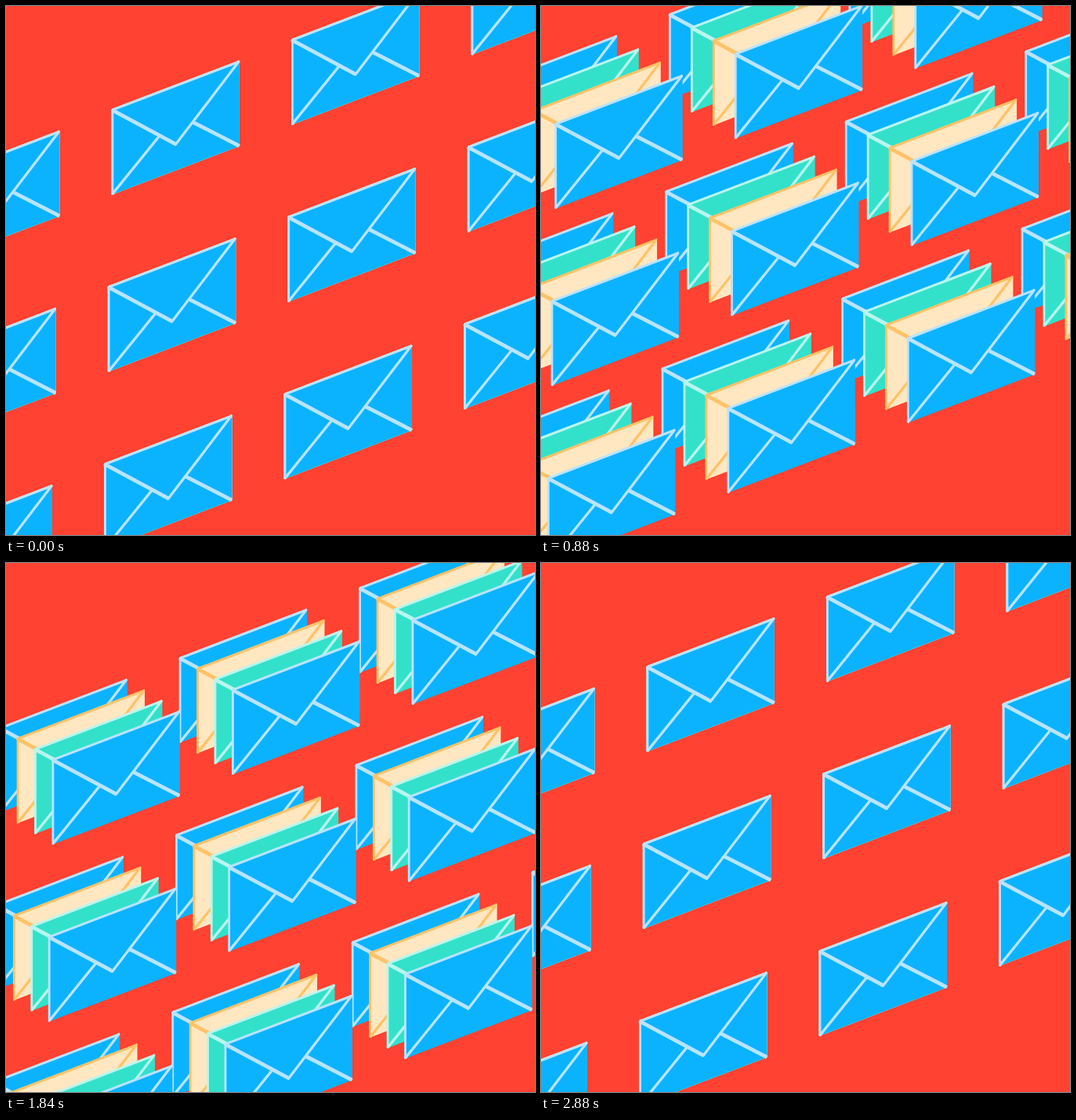
These frames come from a looping animation (675 by 675 pixels, 2.92 s). An HTML page:

```html
<!DOCTYPE html>
<html lang="en">
<head>
<meta charset="utf-8">
<title>Envelopes</title>
<style>
  html, body { margin: 0; width: 100%; height: 100%; overflow: hidden; background: #ff4231; }
  svg { display: block; width: 100%; height: 100%; }
  .edge, .fold { fill: none; stroke-linecap: round; stroke-linejoin: round; }
  .edge { stroke-width: 3.3; }
  .fold { stroke-width: 4.3; }
</style>
</head>
<body>
<svg id="stage" viewBox="0 0 675 675"></svg>
<script>
const NS = 'http://www.w3.org/2000/svg';
const stage = document.getElementById('stage');

const FRAME = 40, FRAMES = 73, TURN = 1440;
const ROWS = 3;
const ORIGIN = { x: 135.7, y: 132.8 };
const ACROSS = { x: 229.5, y: -89.3 };
const DOWN = { x: -4.7, y: 226 };
const SPREAD = { x: 30, y: 18.05 };

const BLUE = { fill: '#0bb3ff', line: '#b9e4fd' };
const CREAM = { fill: '#ffe7c1', line: '#ffc267' };
const GREEN = { fill: '#33e1ca', line: '#b9f6ee' };
const STACK = [BLUE, CREAM, GREEN, BLUE];

function add(parent, tag, attributes) {
  const node = document.createElementNS(NS, tag);
  for (const name in attributes) node.setAttribute(name, attributes[name]);
  return parent.appendChild(node);
}

// A flat envelope, drawn upright and slanted by the matrix.
function addEnvelope(parent, x, y, { fill, line }) {
  const g = add(parent, 'g', { transform: `matrix(.85 -.324 0 1 ${x} ${y})` });
  add(g, 'path', { d: 'M0 0H190.8V107.7H0Z', fill });
  add(g, 'path', { class: 'edge', stroke: line, d: 'M.3 106.5V0H189' });
  add(g, 'path', {
    class: 'fold',
    stroke: line,
    d: 'M1.3 106.3L71 55.6M189 106.3L121.2 54.8M.5 .5L95.3 74.4L189 .3'
  });
}

function addLayer(colors) {
  const layer = add(stage, 'g', {});
  for (let row = 0; row < ROWS; row++) {
    for (let col = -4; col <= 4; col++) {
      const x = ORIGIN.x + col * ACROSS.x + row * DOWN.x;
      const y = ORIGIN.y + col * ACROSS.y + row * DOWN.y;
      addEnvelope(layer, x, y, colors);
    }
  }
  return layer;
}

const layers = STACK.map(addLayer);

// Eased swing: 0, 1, 0, -1, 0 over two turns.
function swing(turn) {
  const v = turn < 0.5 ? 2 * turn : turn < 1.5 ? 2 - 2 * turn : 2 * turn - 4;
  return (3 * v - v ** 3) / 2;
}

let order = 0;
function arrange(wanted) {
  if (wanted === order) return;
  order = wanted;
  stage.append(...(order > 0 ? layers : [...layers].reverse()));
}

function draw(now) {
  const time = Math.floor(now / FRAME) % FRAMES * FRAME;
  const turn = time / TURN % 2;
  const drift = turn % 1;
  const open = swing(turn);
  arrange(turn < 1 ? -1 : 1);
  layers.forEach((layer, i) => {
    const shift = -(i + 1) * open;
    const x = drift * ACROSS.x + shift * SPREAD.x;
    const y = drift * ACROSS.y + shift * SPREAD.y;
    layer.setAttribute('transform', `translate(${x.toFixed(2)} ${y.toFixed(2)})`);
  });
}

const start = performance.now();
function tick() {
  draw(performance.now() - start);
  requestAnimationFrame(tick);
}
tick();
</script>
</body>
</html>
```
